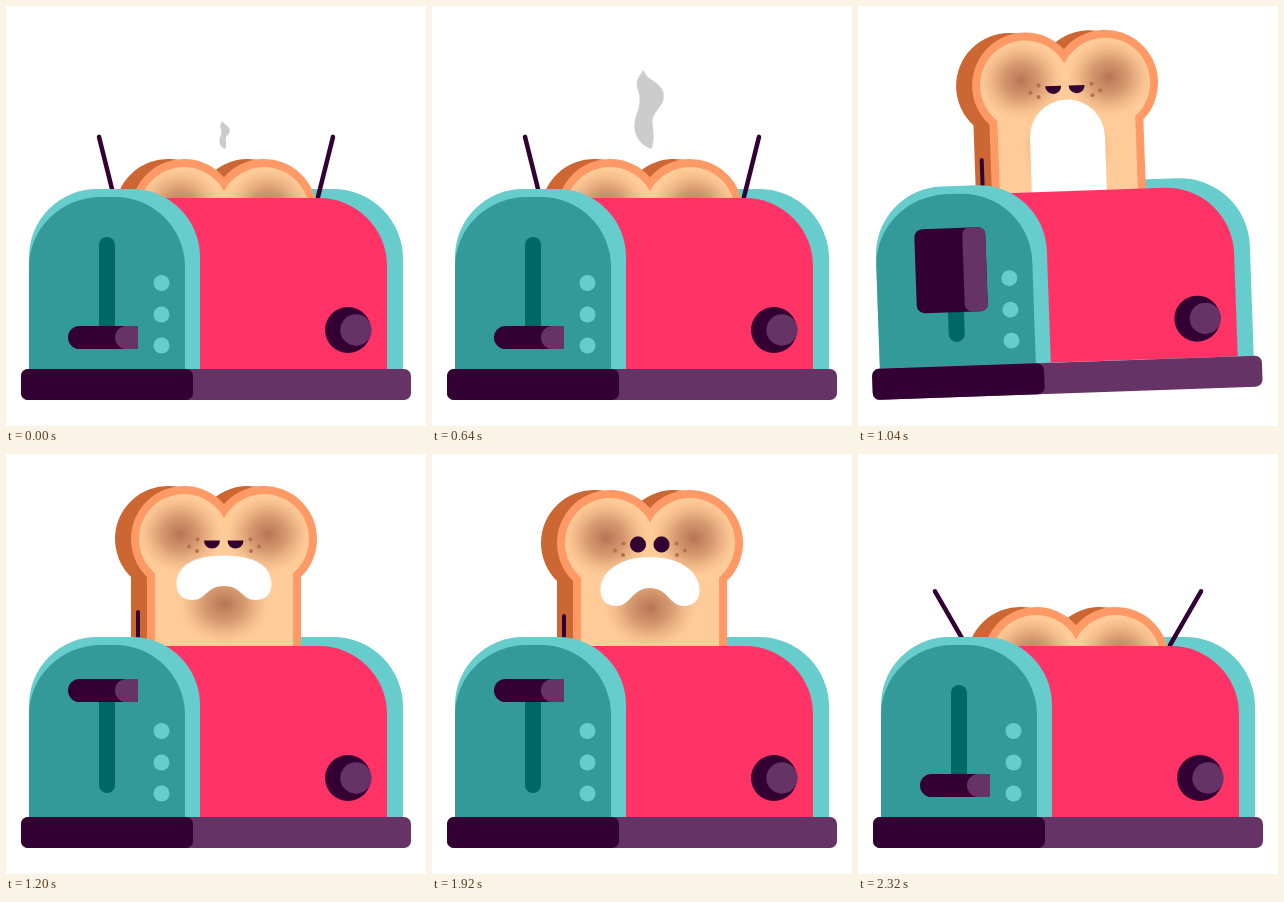
Animation, 420 px wide and 420 px high, one loop 2400 ms. Source, as an HTML page:

```html
<!DOCTYPE html>
<html lang="en">
<head>
<meta charset="utf-8">
<title>Toaster</title>
<style>
html, body { margin: 0; width: 100%; height: 100%; overflow: hidden; background: #fff; }
svg { display: block; width: 100vw; height: 100vh; }
</style>
</head>
<body>
<svg viewBox="0 0 420 420">
  <defs>
    <radialGradient id="roast">
      <stop offset="0" stop-color="#a9654b" stop-opacity=".85"/>
      <stop offset=".45" stop-color="#b5704f" stop-opacity=".55"/>
      <stop offset="1" stop-color="#d99a6c" stop-opacity="0"/>
    </radialGradient>
    <clipPath id="crumbClip"><path class="crumb"/></clipPath>
  </defs>
  <path id="steam" fill="#ccc" d="M-8-79C-6-73-3-71 3-67C11-62 13-56 12-50C11-42 1-36 1-28C1-19 4-12 0 0C-10-3-18-13-17-25C-16-35-11-40-12-53C-13-59-16-62-14-69C-13-73-10-75-8-79Z"/>
  <g id="toaster">
    <path fill="#6cc" d="M290 183H327A70 70 0 0 1 397 253V363H290Z"/>
    <g id="bread">
      <path class="crust" fill="#c63" transform="translate(-16)"/>
      <path d="M132 126V190" stroke="#303" stroke-width="4" stroke-linecap="round"/>
      <path class="crust" fill="#f96"/>
      <path class="crumb" fill="#fc9"/>
      <g clip-path="url(#crumbClip)" fill="url(#roast)">
        <ellipse cx="174" cy="48" rx="42" ry="39"/>
        <ellipse cx="262" cy="48" rx="42" ry="39"/>
        <ellipse cx="218" cy="118" rx="46" ry="40"/>
      </g>
      <g fill="#b86f4b">
        <circle cx="191.5" cy="53.5" r="2"/><circle cx="183" cy="60.5" r="2"/><circle cx="191" cy="65" r="2"/>
        <circle cx="244.5" cy="53.5" r="2"/><circle cx="253" cy="60.5" r="2"/><circle cx="245" cy="65" r="2"/>
      </g>
      <path class="eye" fill="#303" transform="translate(206 54.5)"/>
      <path class="eye" fill="#303" transform="translate(229.5 54.5)"/>
      <path id="mustache" fill="#fff" transform="translate(218)"/>
    </g>
    <path id="arms" stroke="#303" stroke-width="4.5" stroke-linecap="round"/>
    <path fill="#f36" d="M120 192H313A68 68 0 0 1 381 260V363H120Z"/>
    <path fill="#6cc" d="M23 363V251A68 68 0 0 1 91 183H126A68 68 0 0 1 194 251V363Z"/>
    <path fill="#399" d="M23 363V261A72 70 0 0 1 95 191H109A70 70 0 0 1 179 261V363Z"/>
    <rect x="93" y="231" width="16" height="108" rx="8" fill="#066"/>
    <path id="lever" fill="#303"/>
    <path id="grip" fill="#636"/>
    <g fill="#6cc">
      <circle cx="155.5" cy="277" r="8"/><circle cx="155.5" cy="308.5" r="8"/><circle cx="155.5" cy="339.5" r="8"/>
    </g>
    <circle cx="342" cy="324" r="23" fill="#303"/>
    <circle cx="350" cy="324" r="15.7" fill="#636"/>
    <rect x="15" y="363" width="390" height="31" rx="7" fill="#636"/>
    <rect x="15" y="363" width="172" height="31" rx="7" fill="#303"/>
  </g>
</svg>
<script>
const LOOP = 2400, STEP = 80;
const UP = 36, DOWN = 153;
const $ = id => document.getElementById(id);
const setPath = (el, d) => el.setAttribute('d', d);
const move = (el, value) => el.setAttribute('transform', value);
const mix = (a, b, k) => a + (b - a) * k;
const span = (t, a, b) => Math.min(1, Math.max(0, (t - a) / (b - a)));
const ease = k => (1 - Math.cos(Math.PI * k)) / 2;

// Two round lobes on a straight body
function slice(r, half) {
  const neck = 53 + Math.sqrt(r * r - (half - 40) ** 2);
  const notch = 53 - Math.sqrt(r * r - 1600);
  const arc = `A${r} ${r} 0 1 1 `;
  return `M${218 - half} 190V${neck}${arc}218 ${notch}${arc}${218 + half} ${neck}V190Z`;
}

function box(x, y, w, h, left, right) {
  const corner = (r, dx, dy) => `a${r} ${r} 0 0 1 ${dx} ${dy}`;
  return `M${x + left} ${y}H${x + w - right}${corner(right, right, right)}V${y + h - right}` +
    `${corner(right, -right, right)}H${x + left}${corner(left, -left, -left)}V${y + left}${corner(left, left, -left)}Z`;
}

function mustache(w, top, low, notch) {
  return `M${-w} ${low - 16}C${-w} ${low - 33} -32 ${top} 0 ${top}` +
    `C32 ${top} ${w} ${low - 33} ${w} ${low - 16}C${w} ${low - 5} ${w - 7} ${low} ${w - 16} ${low}` +
    `C${w - 30} ${low} 18 ${notch} 0 ${notch}C-18 ${notch} ${30 - w} ${low} ${16 - w} ${low}` +
    `C${7 - w} ${low} ${-w} ${low - 5} ${-w} ${low - 16}Z`;
}

function eye(open) {
  const y = -7.9 * open, x = Math.sqrt(64 - y * y);
  return `M${-x} ${y}A8 8 0 1 0 ${x} ${y}Z`;
}

function arms(length, t) {
  if (!length) return '';
  const since = t >= 2240 ? t - LOOP : t;
  const swing = t >= 2240 || t < 960
    ? -16 * Math.sin(since * Math.PI / 160) * Math.exp(-Math.max(0, since) / 180) : 0;
  const a = (14 + swing) * Math.PI / 180;
  const dx = length * Math.sin(a), dy = length * Math.cos(a);
  return `M108 191l${-dx} ${-dy}M312 191l${dx} ${-dy}`;
}

function draw(t) {
  const kick = t >= 1040 && t < 1120;
  const rebound = t >= 1120 && t < 1200;
  const sunk = t < 1040 ? 1 : ease(span(t, 1920, 2240));
  const settle = ease(span(t, 1200, 1600));

  move($('toaster'), kick ? 'rotate(-2 15 394)' : rebound ? 'rotate(1.2 405 394)' : '');
  const rest = rebound ? 22 : mix(32, UP, settle);
  move($('bread'), `translate(0 ${mix(rest, DOWN, sunk)})`);

  setPath($('mustache'), kick
    ? 'M-37 180V106A37.5 37.5 0 0 1 38 106V180Z'
    : mustache(mix(47.5, 49.5, settle), mix(69.5, 67, settle), mix(114, 116, settle), mix(100, 98, settle)));
  const lids = eye(t < 1040 ? 1 : span(t, 1680, 1920));
  document.querySelectorAll('.eye').forEach(el => setPath(el, lids));
  setPath($('arms'), arms(62 * sunk, t));

  const y = mix(225, 320, sunk);
  setPath($('lever'), kick ? box(62, 225, 71, 84, 8, 7) : box(62, y, 70, 23, 11.5, 2));
  setPath($('grip'), kick ? box(110, 225, 23, 84, 7, 7) : box(109, y, 23, 23, 11.5, 2));

  const size = (28 + t * 0.08) / 79;
  move($('steam'), `translate(219.5 143) scale(${t < 1040 ? size : 0})`);
}

document.querySelectorAll('.crust').forEach(el => setPath(el, slice(53, 77)));
document.querySelectorAll('.crumb').forEach(el => setPath(el, slice(45, 69)));

const start = performance.now();
function frame() {
  const t = (performance.now() - start) % LOOP;
  draw(Math.floor(t / STEP) * STEP);
  requestAnimationFrame(frame);
}
frame();
</script>
</body>
</html>
```
